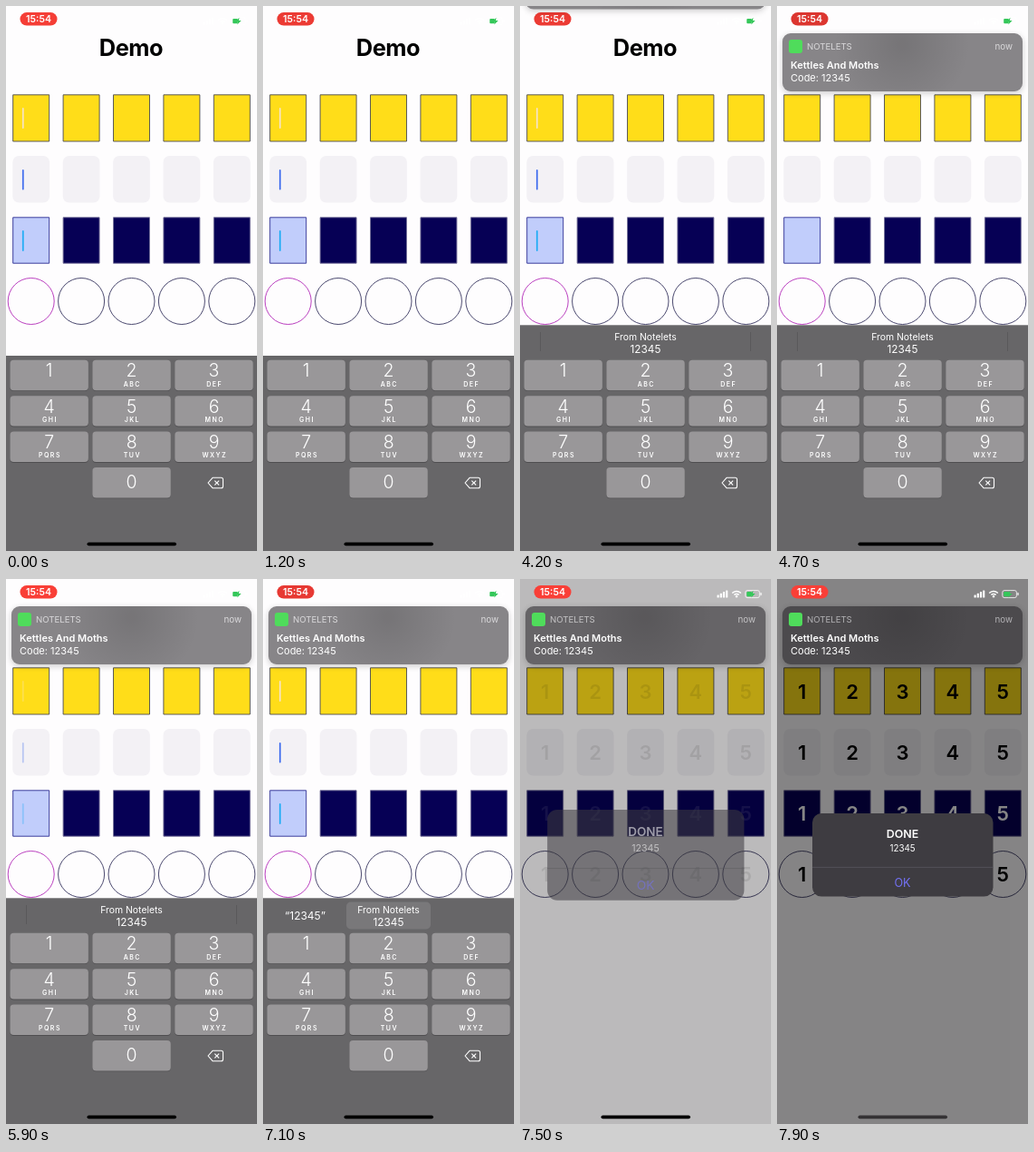
An HTML page with a canvas for the animation above (8000 ms loop, 277 px wide and 600 px high).

```html
<!DOCTYPE html>
<html lang="en">
<head>
<meta charset="utf-8">
<title>Demo</title>
<style>
html, body { margin: 0; width: 100%; height: 100%; overflow: hidden; background: #fefdfe; }
canvas { display: block; width: 277px; height: 600px; }
</style>
</head>
<body>
<canvas id="stage"></canvas>
<script>
const W = 277, H = 600, LOOP = 8000, STEP = 100;
const FONT = 'Inter, Roboto, "Liberation Sans", sans-serif';
const cv = document.getElementById('stage');
const g = cv.getContext('2d');
const dpr = window.devicePixelRatio || 1;
cv.width = Math.round(W * dpr);
cv.height = Math.round(H * dpr);

const ramp = (t, a, b) => Math.min(1, Math.max(0, (t - a) / (b - a)));
const smooth = u => u * u * (3 - 2 * u);
const easeOut = u => 1 - (1 - u) * (1 - u);
const mix = (a, b, u) => a + (b - a) * u;
const mixRgb = (a, b, u) => `rgb(${a.map((v, i) => Math.round(mix(v, b[i], u))).join(',')})`;

function box(x, y, w, h, r, fill, stroke, lw = 1) {
  g.beginPath();
  g.roundRect(x, y, w, h, r);
  if (fill) { g.fillStyle = fill; g.fill(); }
  if (stroke) { g.strokeStyle = stroke; g.lineWidth = lw; g.stroke(); }
}

function line(color, lw, ...pts) {
  g.beginPath();
  pts.forEach(([x, y], i) => i ? g.lineTo(x, y) : g.moveTo(x, y));
  g.strokeStyle = color;
  g.lineWidth = lw;
  g.stroke();
}

// y is the middle of the capitals
function text(s, x, y, size, weight, color, align = 'center', spacing = 0) {
  g.font = `${weight} ${size}px ${FONT}`;
  g.letterSpacing = spacing + 'px';
  g.textAlign = align;
  g.textBaseline = 'alphabetic';
  g.fillStyle = color;
  g.fillText(s, x + (align === 'center' ? spacing / 2 : 0), y + size * 0.364);
}

function withAlpha(a, draw) {
  if (a <= 0) return;
  g.save();
  g.globalAlpha *= a;
  draw();
  g.restore();
}

function caretAlpha(t) {
  const p = t % 1000;
  return p < 500 ? 1 - ramp(p, 430, 620) : Math.max(1 - ramp(p, 430, 620), ramp(p, 850, 1000));
}

function fields(t) {
  const focus = t < 7300;
  const digits = ramp(t, 7480, 7700);
  const caret = focus ? caretAlpha(t) : 0;
  for (let i = 0; i < 5; i++) {
    const cx = 27.7 + 55.4 * i, x = cx - 20;
    const hot = focus && i === 0;
    box(x, 97.8, 40, 51.2, 0, '#ffdd19', '#4a4a52', 0.9);
    box(x - 0.4, 165, 40.8, 51.5, 7, '#f3f1f5');
    box(x, 232.8, 40, 50.4, 0, hot ? '#c1cdfb' : '#060055', hot ? '#2c2c92' : '#77719a', 0.9);
    g.beginPath();
    g.arc(cx, 325, 25.5, 0, Math.PI * 2);
    g.strokeStyle = hot ? '#b32bb8' : '#37355f';
    g.lineWidth = 0.9;
    g.stroke();
    withAlpha(digits, () => [123.5, 190.5, 257.5, 325].forEach((y, row) =>
      text(i + 1, cx, y, 22, 600, row === 2 ? '#fff' : '#000')));
  }
  withAlpha(caret, () => {
    box(17.9, 112, 1.8, 23, 0.9, '#f6e3c0');
    box(17.9, 180, 1.8, 22.5, 0.9, '#4571ee');
    box(17.9, 247, 1.8, 23, 0.9, '#25aef5');
  });
}

function key(label, sub, col, row) {
  const x = 4.5 + 90.9 * col, y = 389.8 + 39.4 * row, w = 86.4, h = 33.4;
  box(x, y + 0.9, w, h, 4, '#4f4e50');
  box(x, y, w, h, 4, '#999799');
  text(label, x + w / 2, row === 3 ? y + 16 : y + 11.6, 19.5, 300, '#fff');
  if (sub) text(sub, x + w / 2, y + 26.3, 7, 600, '#fff', 'center', 1.5);
}

function suggestions(t) {
  const picked = t >= 7000;
  if (picked) {
    box(92, 355.5, 93, 30, 5, '#79787a');
    text('“12345”', 46.5, 371, 12, 400, '#fff');
  } else {
    line('#5a595b', 1, [22.5, 359], [22.5, 380]);
    line('#5a595b', 1, [254.5, 359], [254.5, 380]);
  }
  text('From Notelets', 138.5, 364.5, 10.4, 400, '#fff');
  text('12345', 138.5, 378, 11.8, 400, '#fff');
}

function keyboard(t) {
  const gone = easeOut(ramp(t, 7220, 7480));
  if (gone >= 1) return;
  const bar = smooth(ramp(t, 1350, 1600));
  const top = mix(385, 351.3, bar);
  g.save();
  g.translate(0, 250 * gone);
  g.fillStyle = '#676668';
  g.fillRect(0, top, W, H - top);
  withAlpha(bar, () => suggestions(t));
  const subs = ['', 'ABC', 'DEF', 'GHI', 'JKL', 'MNO', 'PQRS', 'TUV', 'WXYZ'];
  subs.forEach((s, i) => key(i + 1, s, i % 3, Math.floor(i / 3)));
  key(0, '', 1, 3);
  g.beginPath();
  g.moveTo(223, 525);
  g.lineTo(228, 519.3);
  g.lineTo(237.5, 519.3);
  g.quadraticCurveTo(239.5, 519.3, 239.5, 521.3);
  g.lineTo(239.5, 528.7);
  g.quadraticCurveTo(239.5, 530.7, 237.5, 530.7);
  g.lineTo(228, 530.7);
  g.closePath();
  g.strokeStyle = '#fff';
  g.lineWidth = 1.1;
  g.lineJoin = 'round';
  g.stroke();
  line('#fff', 1.1, [230.3, 522.6], [235.1, 527.4]);
  line('#fff', 1.1, [235.1, 522.6], [230.3, 527.4]);
  g.restore();
}

function alertBox(p) {
  withAlpha(p, () => {
    const s = 1 + 0.2 * (1 - p);
    g.translate(138.5, 303.8);
    g.scale(s, s);
    g.translate(-138.5, -303.8);
    box(39, 258, 199.5, 91.6, 10, '#3e3c41');
    line('#59575d', 0.8, [39, 317.4], [238.5, 317.4]);
    text('DONE', 138.5, 280.3, 12.4, 600, '#fff');
    text('12345', 138.5, 296.3, 9.8, 400, '#fff');
    text('OK', 138.5, 334, 12.6, 400, '#7371f5');
  });
}

function status(t) {
  const beat = 0.5 + 0.5 * Math.cos((t / 2000 - 0.85) * Math.PI * 2);
  box(15.5, 7, 41, 14.6, 7.3, mixRgb([220, 54, 48], [252, 64, 56], beat));
  text('15:54', 36, 14.4, 10.6, 600, '#fff');

  for (let i = 0; i < 4; i++) {
    const h = 3 + 1.7 * i;
    box(217.5 + 3.2 * i, 20.5 - h, 2.2, h, 0.6, '#fff');
  }
  g.strokeStyle = '#fff';
  g.lineWidth = 1.5;
  for (const r of [3.6, 6.6]) {
    g.beginPath();
    g.arc(239, 20, r, -Math.PI * 0.76, -Math.PI * 0.24);
    g.stroke();
  }
  g.beginPath();
  g.arc(239, 19.3, 1.2, 0, Math.PI * 2);
  g.fillStyle = '#fff';
  g.fill();
  box(248.8, 12.6, 15.6, 8, 2.2, null, '#fff', 0.8);
  box(265.4, 15, 1.2, 3.2, 0.6, '#fff');
  box(250.2, 14, 5.6, 5.3, 1, '#34c759');
  g.beginPath();
  [[257.5, 12.8], [253.2, 17.2], [256, 17.2], [255.2, 20.6], [259.6, 16], [256.8, 16]]
    .forEach(([x, y], i) => i ? g.lineTo(x, y) : g.moveTo(x, y));
  g.closePath();
  g.fill();
}

function banner(t, dim) {
  const p = smooth(ramp(t, 4150, 4650));
  if (p <= 0) return;
  g.save();
  g.translate(0, -93 * (1 - p));
  g.save();
  g.shadowColor = 'rgba(0,0,0,.2)';
  g.shadowBlur = 7 * dpr;
  g.shadowOffsetY = 2 * dpr;
  box(6, 30, 265, 64, 9, mixRgb([135, 133, 136], [76, 74, 77], dim));
  g.restore();
  const shade = g.createRadialGradient(138, 42, 4, 138, 42, 75);
  shade.addColorStop(0, 'rgba(0,0,0,.12)');
  shade.addColorStop(1, 'rgba(0,0,0,0)');
  box(6, 30, 265, 64, 9, shade);
  box(13, 37, 15, 15, 3, '#4fdc5b');
  const soft = mixRgb([218, 217, 219], [178, 177, 180], dim);
  text('NOTELETS', 33, 44.7, 9.6, 400, soft, 'left');
  text('now', 260, 44.7, 9.8, 400, soft, 'right');
  text('Kettles And Moths', 15, 65, 11, 600, '#fff', 'left');
  text('Code: 12345', 15, 79.2, 11, 400, '#fff', 'left');
  g.restore();
}

function draw(t) {
  g.setTransform(dpr, 0, 0, dpr, 0, 0);
  g.fillStyle = '#fefdfe';
  g.fillRect(0, 0, W, H);
  const pop = easeOut(ramp(t, 7400, 7700));
  text('Demo', 138.2, 45.6, 25.4, 700, '#000', 'center', -0.5);
  fields(t);
  keyboard(t);
  g.fillStyle = `rgba(0,0,0,${0.48 * pop})`;
  g.fillRect(0, 0, W, H);
  alertBox(pop);
  status(t);
  banner(t, pop);
  box(89.5, 590.4, 98.5, 3.8, 1.9, mixRgb([0, 0, 0], [52, 50, 52], ramp(t, 7500, 7800)));
}

const start = performance.now();
function tick() {
  const t = (performance.now() - start) % LOOP;
  draw(Math.floor(t / STEP) * STEP);
  requestAnimationFrame(tick);
}
tick();
</script>
</body>
</html>
```
